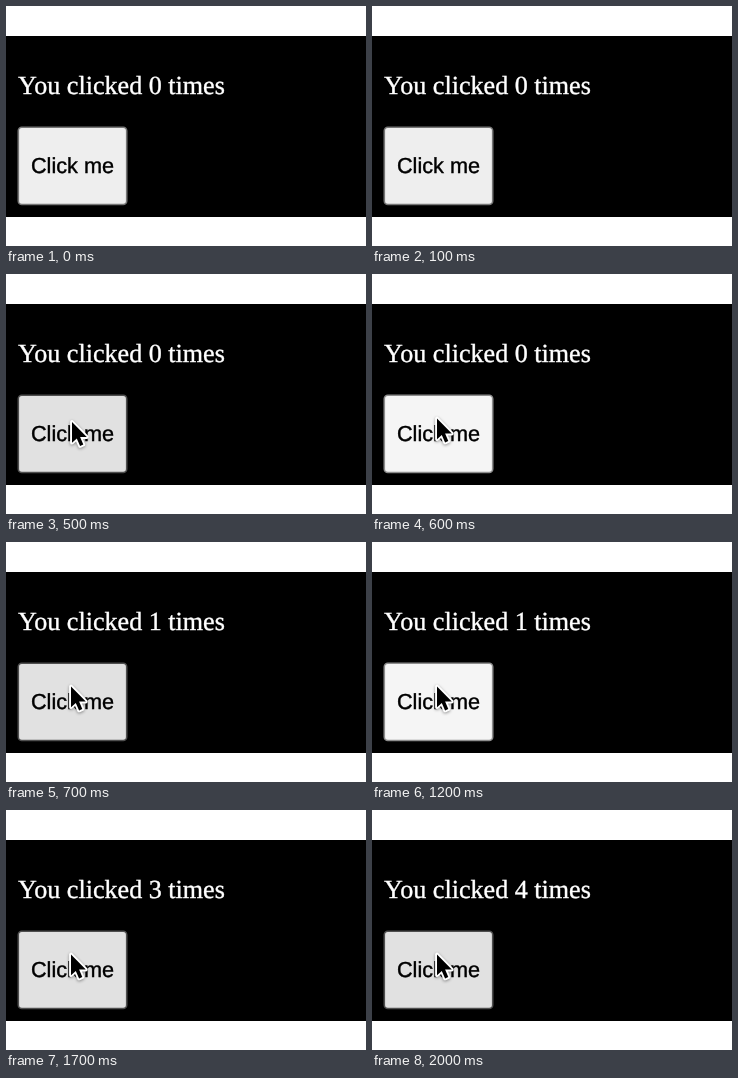
An HTML page that plays this animation: 360x240 px, repeating every 2.4 s.

```html
<!DOCTYPE html>
<html lang="en">
<head>
<meta charset="utf-8">
<title>Click counter</title>
<style>
  html, body { margin: 0; width: 100%; height: 100%; overflow: hidden; background: #fff; }
  svg { display: block; width: 360px; height: 240px; }
  text { text-rendering: geometricPrecision; stroke-width: .4; }
  #message { font: 26.1px "Liberation Serif", "Times New Roman", serif; fill: #fff; stroke: #fff; }
  #label { font: 21.7px "Liberation Sans", Arial, sans-serif; fill: #000; stroke: #000; text-anchor: middle; }
  #cursor { stroke: #fff; stroke-width: 3.8; stroke-linejoin: round; paint-order: stroke;
            filter: drop-shadow(0 1.5px 1.5px #0006); }
</style>
</head>
<body>
<svg viewBox="0 0 360 240">
  <clipPath id="page"><rect y="30" width="360" height="181"/></clipPath>
  <g clip-path="url(#page)">
    <rect y="30" width="360" height="181"/>
    <text id="message" x="12" y="87.6"></text>
    <rect id="button" x="12.3" y="121.3" width="108.4" height="77.2" rx="3.5" stroke-width="1.6"/>
    <text id="label" x="66.5" y="166.7">Click me</text>
    <path id="cursor" d="M0 0V20.7L4.8 16.4 8.1 23.9 11.3 22.5 8.1 15.1H14.8Z"/>
  </g>
</svg>
<script>
const LOOP = 2400;
const CLICKS = [700, 1300, 1700, 2000];
const STYLES = {
  idle: ["#eeeeee", "#767676"],
  hover: ["#e1e1e1", "#4f4f4f"],
  pressed: ["#f5f5f5", "#8d8d8d"]
};
// The pointer jumps between these places: [time, x, y]
const POINTER = [[400, 89.5, 184.5], [500, 66, 148], [600, 65, 144.5]];

const [message, button, cursor] =
  ["message", "button", "cursor"].map(id => document.getElementById(id));

function buttonState(t) {
  const within = (start, end) => t >= start && t < end;
  if (within(600, 700) || within(1200, 1300)) return "pressed";
  return t < 500 ? "idle" : "hover";
}

function draw(t) {
  const count = CLICKS.filter(time => t >= time).length;
  message.textContent = `You clicked ${count} times`;

  const [fill, stroke] = STYLES[buttonState(t)];
  button.setAttribute("fill", fill);
  button.setAttribute("stroke", stroke);

  const place = POINTER.filter(([time]) => t >= time).pop();
  cursor.setAttribute("visibility", place ? "visible" : "hidden");
  if (place) cursor.setAttribute("transform", `translate(${place[1]} ${place[2]})`);
}

const start = performance.now();
function tick() {
  draw((performance.now() - start) % LOOP);
  requestAnimationFrame(tick);
}
tick();
</script>
</body>
</html>
```
